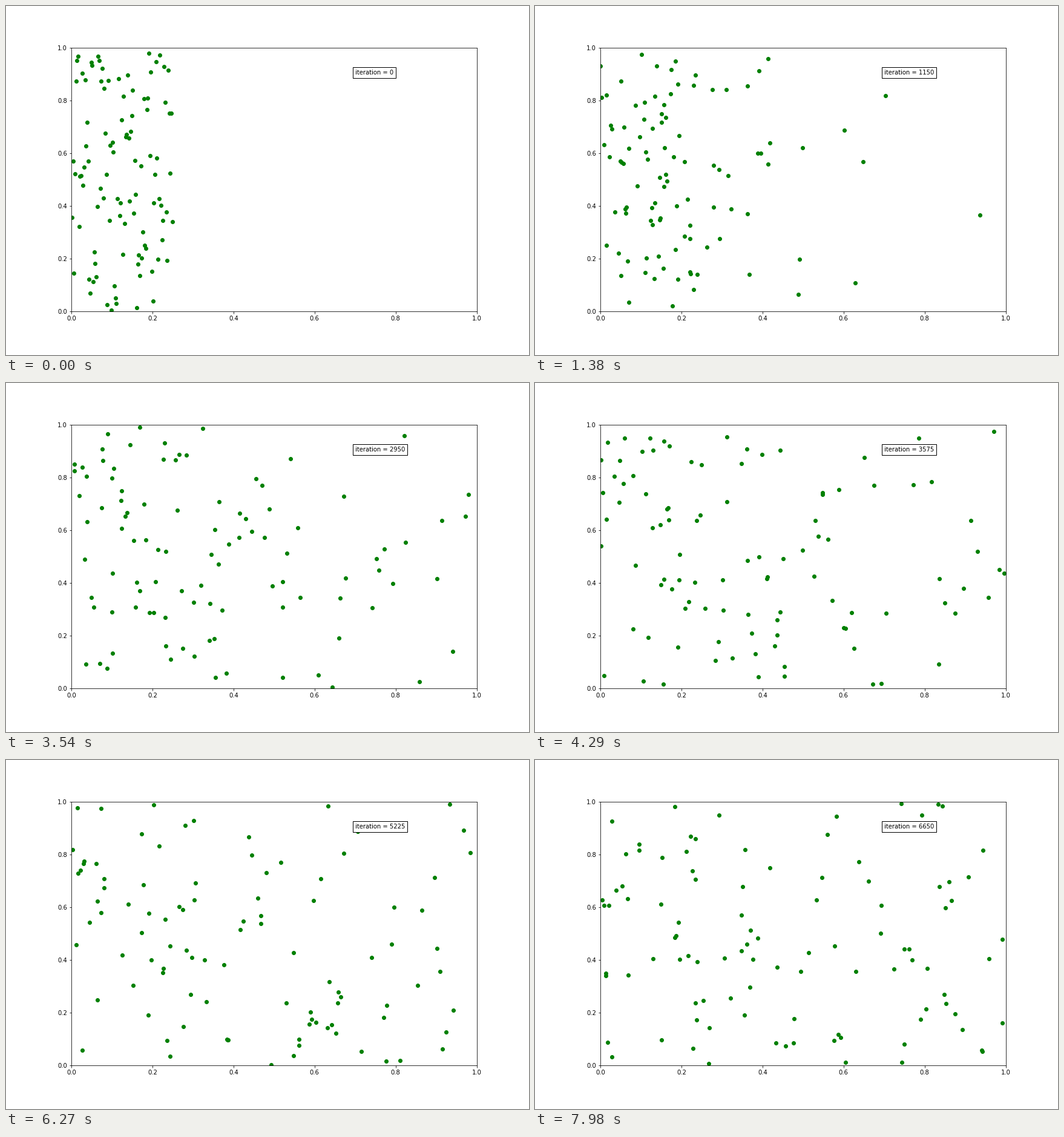
Animation, 864 px wide and 576 px high, one loop 8 s. Source, as a matplotlib script:

```python
import numpy as np
import matplotlib.pyplot as plt
from matplotlib.animation import FuncAnimation

W, H, DPI = 864, 576, 72
FRAMES, LOOP_MS = 267, 8000
ITERS = 25           # iterations per frame
COUNT = 100
START_WIDTH = 0.25   # the gas starts in the left quarter of the box
SPEED = 0.000135     # typical speed per iteration

rng = np.random.default_rng(7)


def spread():
    """Evenly spaced values between 0 and 1 in random order."""
    return (rng.permutation(COUNT) + 0.5) / COUNT


def velocities():
    """Many slow particles and a few fast ones, in both directions."""
    u = spread() - 0.5
    return -SPEED * np.sign(u) * np.log(1 - 2 * np.abs(u))


start = np.column_stack([START_WIDTH * spread(), rng.uniform(0, 1, COUNT)])
velocity = np.column_stack([velocities(), velocities()])


def positions(iteration):
    """Straight flight, reflected by the walls at 0 and 1."""
    free = start + velocity * iteration
    return 1 - np.abs(1 - free % 2)


plt.rcParams["font.family"] = "DejaVu Sans"
fig = plt.figure(figsize=(W / DPI, H / DPI), dpi=DPI)
ax = fig.add_axes([0.125, 0.125, 0.775, 0.755])
ax.set_xlim(0, 1)
ax.set_ylim(0, 1)
dots, = ax.plot([], [], "o", color="green", markersize=6)
label = ax.text(0.7, 0.9, "", fontsize=10,
                bbox=dict(facecolor="white", edgecolor="black"))


def draw(i):
    iteration = i * ITERS
    dots.set_data(*positions(iteration).T)
    label.set_text(f"iteration = {iteration}")
    return dots, label


anim = FuncAnimation(fig, draw, frames=FRAMES, init_func=lambda: draw(0),
                     interval=LOOP_MS / FRAMES, repeat=True, repeat_delay=0)
plt.show()
```
